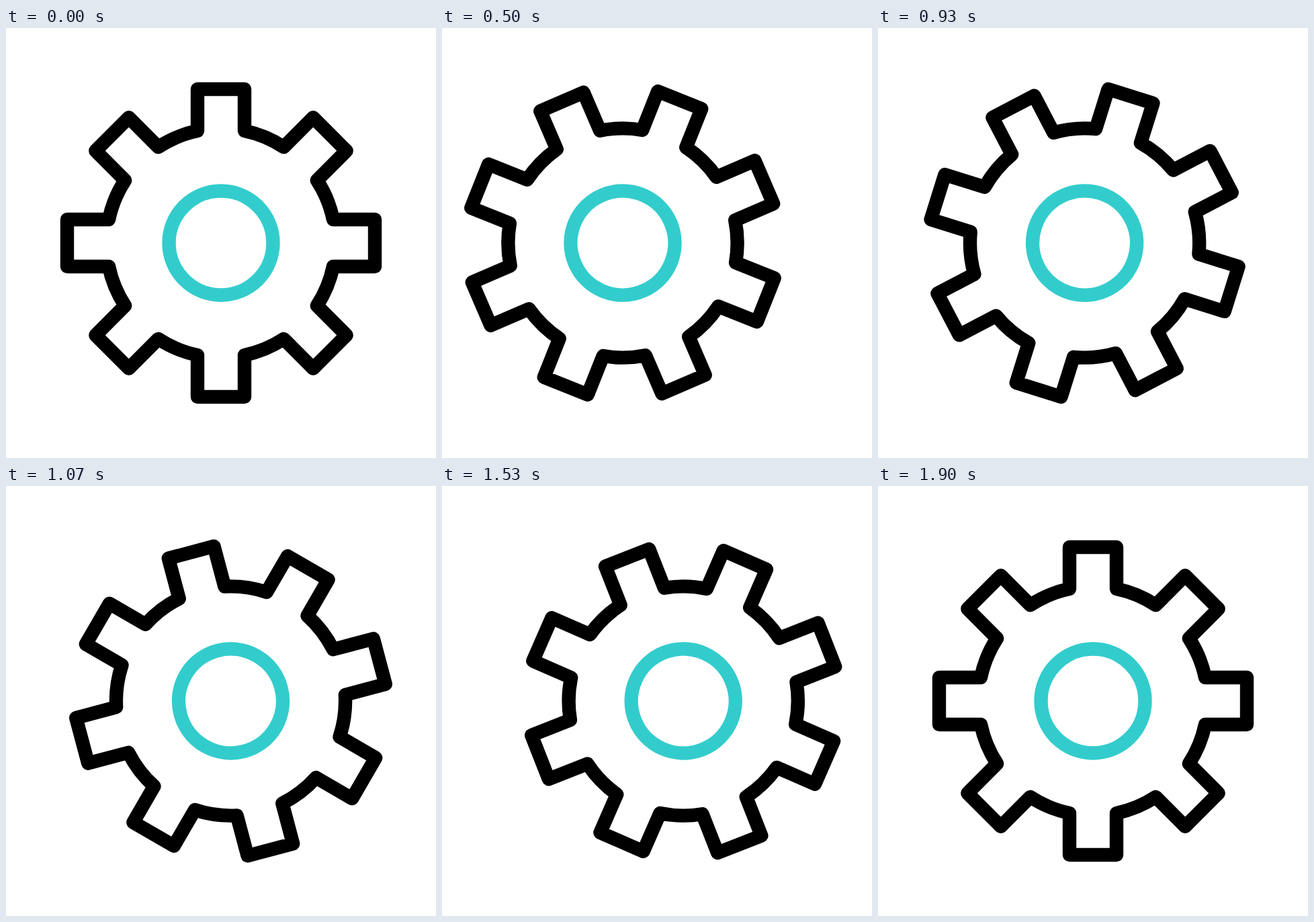
Animation, 640 px wide and 640 px high, one loop 2000 ms. Source, as an HTML page:

```html
<!DOCTYPE html>
<html lang="en">
<head>
<meta charset="utf-8">
<title>Rolling gear</title>
<style>
  html, body { margin: 0; width: 100%; height: 100%; overflow: hidden; background: #fff; }
  svg { display: block; width: 100vw; height: 100vh; }
</style>
</head>
<body>
<svg viewBox="0 0 640 640" fill="none" stroke-width="20.4" stroke-linejoin="round">
  <g id="gear">
    <path id="teeth" stroke="#000"/>
    <circle r="77.5" stroke="#3cc"/>
  </g>
</svg>
<script>
const LOOP = 2000, STEP = 100 / 3, LAST = 57;
const gear = document.getElementById('gear');

// Eight teeth joined by arcs of the root circle
const ROOT = 170.6, TIP = 229, HALF = 35;
const base = Math.sqrt(ROOT ** 2 - HALF ** 2);
let outline = '';
for (let i = 0; i < 8; i++) {
  const a = i * Math.PI / 4, c = Math.cos(a), s = Math.sin(a);
  const at = (x, y) => `${(x * c - y * s).toFixed(2)} ${(x * s + y * c).toFixed(2)}`;
  outline += (i ? `A${ROOT} ${ROOT} 0 0 1 ` : 'M') + at(-HALF, -base) +
    'L' + [at(-HALF, -TIP), at(HALF, -TIP), at(HALF, -base)].join('L');
}
const start = outline.match(/^M(\S+ \S+?)L/)[1];
document.getElementById('teeth').setAttribute('d', `${outline}A${ROOT} ${ROOT} 0 0 1 ${start}Z`);

// [step, horizontal offset, rotation in degrees]
const keys = [
  [0, 0, 0], [17.5, -54, -72.3], [23, -42.8, -47.5], [32, 14.5, 75.1], [40, 50.6, 155.1],
  [41.5, 53, 157.5], [43, 50.8, 148], [46, 39.2, 113.6], [48, 31.5, 91.5], [57, 0, 0]
];

// Tangent at a key: flat at the ends and at turning points
function slope(i, col) {
  if (!i || i === keys.length - 1) return 0;
  const [p, k, n] = keys.slice(i - 1, i + 2);
  const h0 = k[0] - p[0], h1 = n[0] - k[0];
  const d0 = (k[col] - p[col]) / h0, d1 = (n[col] - k[col]) / h1;
  return d0 * d1 <= 0 ? 0 : (d0 * h1 + d1 * h0) / (h0 + h1);
}

function value(n, col) {
  const i = Math.max(1, keys.findIndex(k => k[0] >= n));
  const a = keys[i - 1], b = keys[i], h = b[0] - a[0], u = (n - a[0]) / h;
  const e = u * u * (3 - 2 * u);
  return a[col] + (b[col] - a[col]) * e +
    h * u * (1 - u) * (slope(i - 1, col) * (1 - u) - slope(i, col) * u);
}

function draw() {
  const t = Math.floor(performance.now() % LOOP / 10) * 10;
  const n = Math.min(LAST, Math.floor((t + 3.4) / STEP));
  gear.setAttribute('transform', `translate(${320 + value(n, 1)} 320) rotate(${value(n, 2)})`);
  requestAnimationFrame(draw);
}
draw();
</script>
</body>
</html>
```
